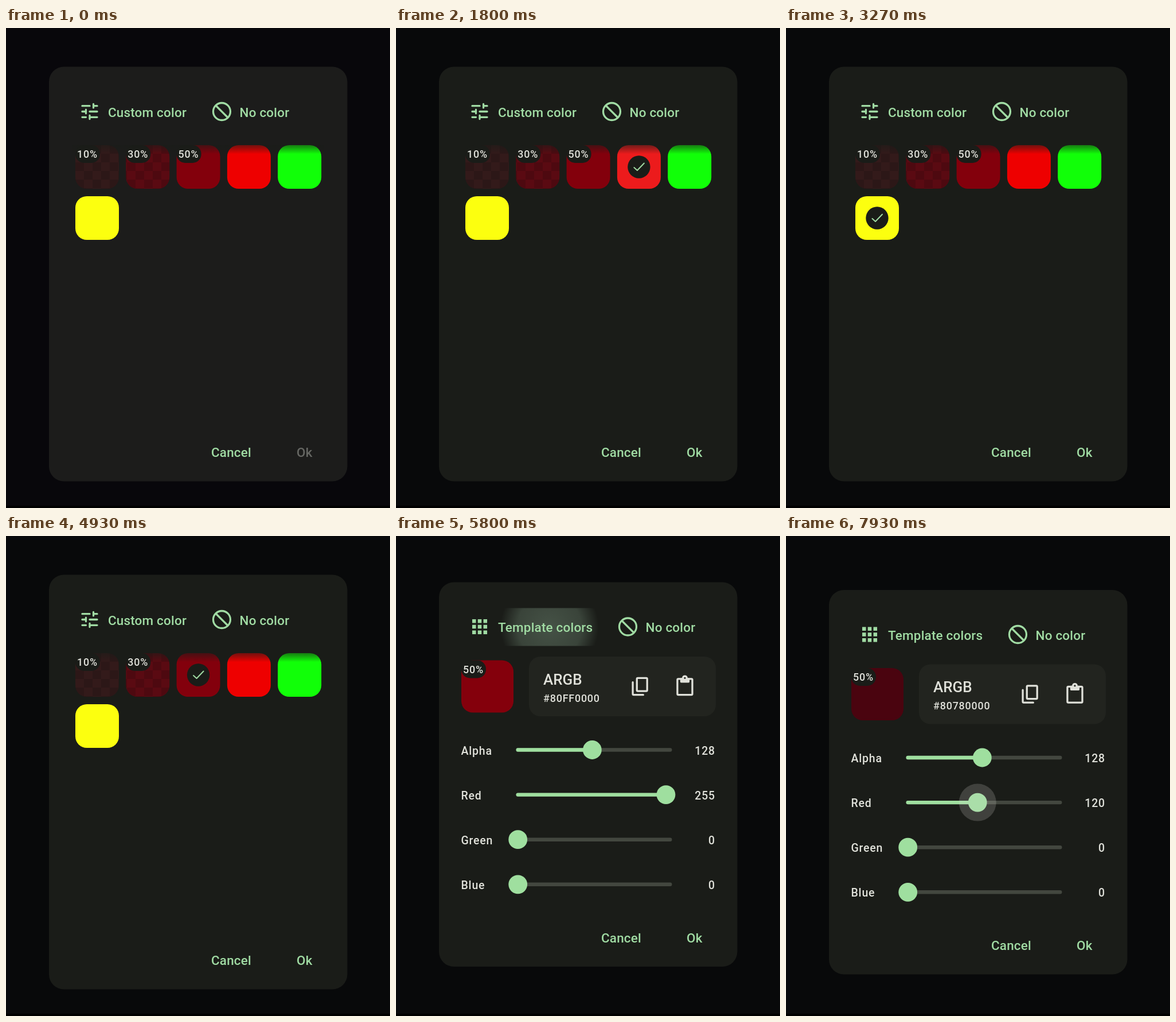
Recreate the animation shown at these times as an HTML page. Size 670 by 836 pixels, loop 8000 ms.

```html
<!DOCTYPE html>
<html>
<head>
<meta charset="utf-8">
<style>
html, body { margin: 0; width: 100%; height: 100%; overflow: hidden; background: #08090a; }
svg { display: block; width: 670px; height: 836px; font-family: Roboto, sans-serif; font-weight: 500; }
.btn { font-size: 22.5px; letter-spacing: .16px; fill: #a0dba3; }
.tag { font-size: 17.9px; letter-spacing: .8px; fill: #e0e1da; }
.row { font-size: 19.5px; letter-spacing: .8px; fill: #e0e1da; }
.big { font-size: 26px; fill: #e0e1da; }
.end { text-anchor: end; }
.line { fill: none; stroke: #a0dba3; stroke-width: 2; stroke-linecap: round; stroke-linejoin: round; }
.pale { stroke: #e0e1da; }
</style>
</head>
<body>
<svg viewBox="0 0 670 836">
  <defs>
    <linearGradient id="fade" x1="0" y1="0" x2="0" y2="1">
      <stop offset="0" stop-color="#1a1c18" stop-opacity=".6"/>
      <stop offset="1" stop-color="#1a1c18" stop-opacity="0"/>
    </linearGradient>
    <radialGradient id="glow">
      <stop offset="0" stop-color="#455246"/>
      <stop offset=".65" stop-color="#3a443a"/>
      <stop offset="1" stop-color="#3a443a" stop-opacity="0"/>
    </radialGradient>
    <pattern id="checker" x="121" y="204" width="30" height="30" patternUnits="userSpaceOnUse">
      <path d="M0 0h15v15H0zM15 15h15v15H15z" fill="#000" fill-opacity=".13"/>
    </pattern>
    <clipPath id="pill"><rect x="114" y="139" width="258" height="66" rx="33"/></clipPath>
  </defs>
  <rect id="back" width="670" height="836"/>
  <rect y="832" width="670" height="4" fill="#000"/>
  <g id="templates"></g>
  <g id="custom"></g>
</svg>
<script>
const $ = id => document.getElementById(id);
const clamp = v => Math.max(0, Math.min(1, v));
const span = (t, a, b) => clamp((t - a) / (b - a));
const mix = (a, b, k) => `rgb(${a.map((v, i) => Math.round(v + (b[i] - v) * k))})`;

const text = (x, y, cls, s, id = '') => `<text x="${x}" y="${y}" class="${cls}" id="${id}">${s}</text>`;
const rect = (x, y, w, h, r, fill, extra = '') =>
  `<rect x="${x}" y="${y}" width="${w}" height="${h}" rx="${r}" fill="${fill}" ${extra}/>`;
// 24-unit icon centred on a point
const icon = (x, y, body, cls = 'line') =>
  `<g class="${cls}" transform="translate(${x} ${y}) scale(1.63) translate(-12 -12)">${body}</g>`;
const noColor = (x, y) =>
  icon(x, y, '<circle cx="12" cy="12" r="9.2"/><path d="M5.7 5.7 18.3 18.3"/>') + text(x + 31, y + 9, 'btn', 'No color');
const label = (x, y, s) => rect(x, y, 43, 31, 15, '#1a1c18') + text(x + 3, y + 22, 'tag', s);

// Template colours
const tiles = [
  ['#331a1a', '10%'], ['#5a0a12', '30%'], ['#83000c', '50%'],
  ['#ee0000'], ['#11ff08'], ['#fcff0f']
].map(([fill, tag], i) => ({ fill, tag, x: 121 + i % 5 * 88.3, y: i < 5 ? 204 : 293 }));

$('templates').innerHTML =
  rect(75, 67.5, 520.5, 722, 26, '', 'id="panel"') +
  icon(146, 145.5, '<path d="M4 18h4M12 16v4M12 18h8M4 12h4M8 10v4M12 12h8M4 6h8M16 4v4M16 6h4"/>') +
  text(178, 154.5, 'btn', 'Custom color') + noColor(376.5, 145.5) +
  tiles.map(({ fill, x, y }, i) =>
    rect(x, y, 76, 76, 20, fill) + (i < 2 ? rect(x, y, 76, 76, 20, 'url(#checker)') : '') +
    rect(x, y, 76, 76, 20, '#dddde6', `id="ripple${i}"`)).join('') +
  rect(115, 203.5, 440, 16, 0, 'url(#fade)') +
  tiles.map(({ tag, x, y }, i) =>
    `<g id="tag${i}">${tag ? label(x, y, tag) : ''}</g>` +
    `<g id="tick${i}" transform="translate(${x + 38} ${y + 38})"><circle r="19.7" fill="#1a1c18"/>` +
    '<path class="line" stroke-linecap="butt" d="M-8.5 1 -3 6 9 -6.5"/></g>').join('') +
  text(358, 747, 'btn', 'Cancel') + text(507, 747, 'btn', 'Ok', 'ok');

// Custom colour
const channels = ['Alpha', 'Red', 'Green', 'Blue'];
const values = [128, 255, 0, 0];
const grid = [4, 10, 16].map(y => [4, 10, 16].map(x => rect(x, y, 4, 4, 0, '#a0dba3')).join('')).join('');

$('custom').innerHTML =
  rect(75, 94, 520.5, 669.5, 26, '#1a1c18') +
  rect(114, 139, 258, 66, 33, '#1e1f1a', 'id="trace"') +
  '<g clip-path="url(#pill)"><circle id="press" cx="268" cy="172" fill="url(#glow)"/></g>' +
  icon(146, 171.5, grid, '') + text(178, 180.5, 'btn', 'Template colors') + noColor(404.5, 171.5) +
  rect(114, 230, 91, 91, 20, '', 'id="swatch"') + label(114, 230, '50%') +
  rect(232, 223.5, 326, 104, 20, '#22241f') +
  text(257, 272, 'big', 'ARGB') + text(257, 302, 'tag', '', 'hex') +
  icon(425.5, 275.5, '<rect x="8.8" y="3" width="11" height="14" rx="1"/><path d="M4.4 7.5V20a1 1 0 0 0 1 1H15.6"/>', 'line pale') +
  icon(504, 275.5, '<rect x="4" y="4" width="16" height="17" rx="1"/>' +
    '<path d="M8 4h8v3H8z" fill="#e0e1da"/><circle cx="12" cy="3" r="2" fill="#22241f"/>', 'line pale') +
  channels.map((name, i) => {
    const y = 386 + i * 78.1;
    return text(113.5, y + 8, 'row', name) + text(557, y + 8, 'row end', '', 'value' + i) +
      rect(209.5, y - 3.2, 272, 6.4, 3.2, '#43473f') +
      rect(209.5, y - 3.2, 0, 6.4, 3.2, '#9fdf9f', `id="bar${i}"`) +
      `<circle id="thumb${i}" cy="${y}" r="16.4" fill="#9fdf9f"/>`;
  }).join('') +
  '<circle id="halo" cy="464.1" fill="#d8d8d0" fill-opacity=".2"/>' +
  text(358, 721, 'btn', 'Cancel') + text(507, 721, 'btn', 'Ok');

const show = (id, on) => $(id).setAttribute('visibility', on ? 'inherit' : 'hidden');
const set = (id, name, v) => $(id).setAttribute(name, v);

// [time, tile, end of its ripple]
const picks = [[1150, 3, 1980], [2350, 4, 2800], [3050, 5, 3260], [3700, 2, 4000]];

function drawTemplates(t) {
  const [start, chosen, end] = picks.filter(p => t >= p[0]).pop() || [0, -1, 0];
  const tone = span(t, 100, 1100);
  set('back', 'fill', mix([8, 7, 11], [8, 9, 10], tone));
  set('panel', 'fill', mix([28, 28, 27], [26, 28, 24], tone));
  $('ok').style.fill = chosen < 0 ? '#666763' : '';
  tiles.forEach((_, i) => {
    const on = i === chosen;
    show('tick' + i, on);
    show('tag' + i, !on);
    set('ripple' + i, 'opacity', on ? .12 * span(t, start - 1, start + 80) * span(t, end, end - 150) : 0);
  });
}

function drawCustom(t) {
  set('custom', 'transform', `translate(0 ${-13.5 * (1 - span(t, 5805, 5870))})`);
  set('press', 'r', 85 + 150 * span(t, 5800, 6050));
  set('press', 'opacity', 1 - span(t, 5850, 6350));
  show('trace', t > 5870 && t < 7700);

  const drag = span(t, 7660, 7920);
  values[1] = Math.round(255 - 135 * drag * drag * (3 - 2 * drag));
  values.forEach((v, i) => {
    const x = 212.7 + v * 1.013;
    set('thumb' + i, 'cx', x);
    set('bar' + i, 'width', x - 209.5);
    $('value' + i).textContent = v;
  });
  set('halo', 'cx', 212.7 + values[1] * 1.013);
  set('halo', 'r', 32.5 * span(t, 7660, 7780));
  $('hex').textContent = '#' + values.map(v => v.toString(16).padStart(2, '0')).join('').toUpperCase();
  set('swatch', 'fill', mix([74, 4, 15], [132, 0, 12], (values[1] - 120) / 135));
}

function frame() {
  const t = performance.now() % 8000;
  const custom = t >= 5795;
  show('templates', !custom);
  show('custom', custom);
  drawTemplates(t);
  drawCustom(t);
  requestAnimationFrame(frame);
}
frame();
</script>
</body>
</html>
```
